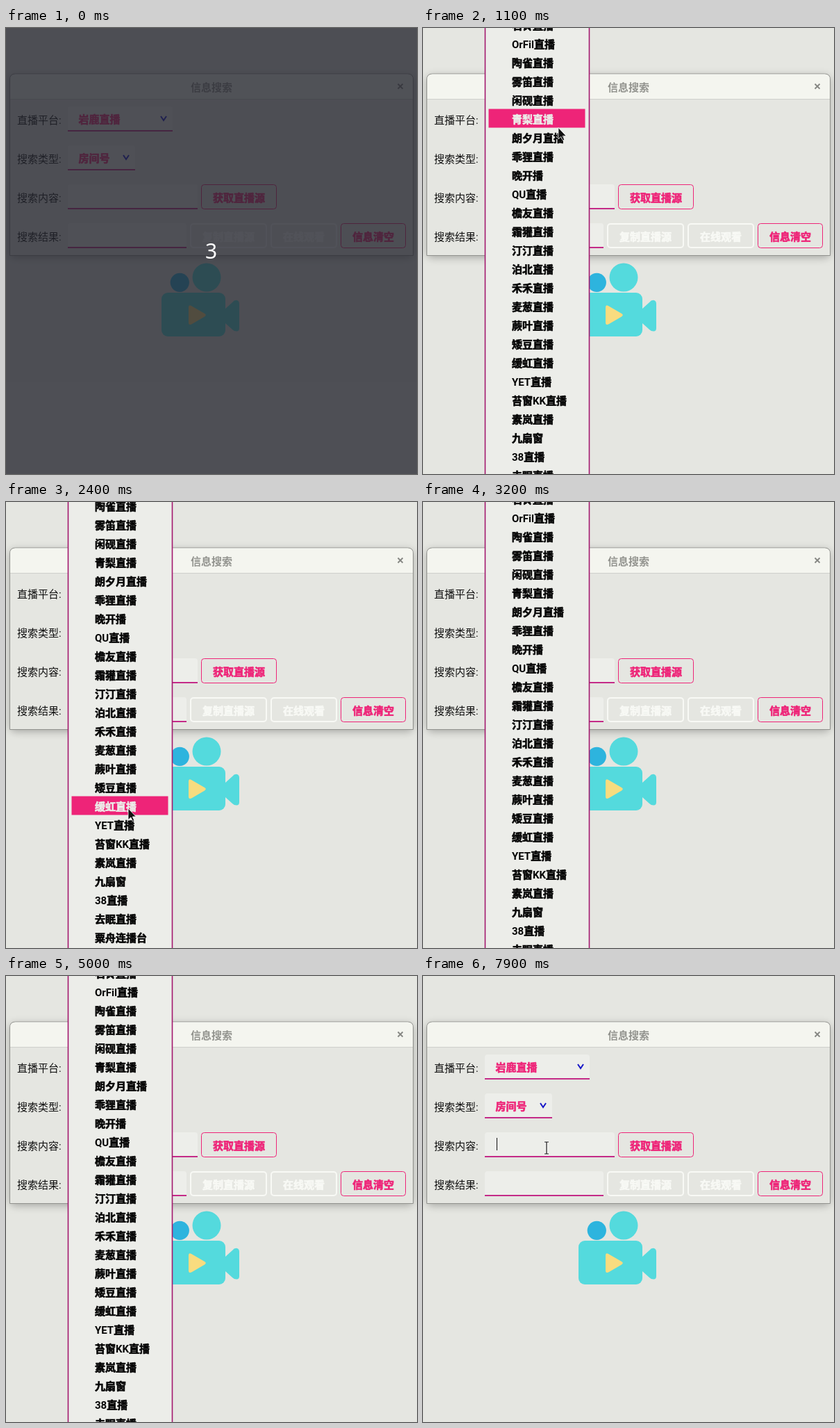
An HTML page for the animation above (8 s loop, 592x642 px).

```html
<!DOCTYPE html>
<html lang="zh-CN">
<head>
<meta charset="utf-8">
<title>信息搜索</title>
<style>
html, body { margin: 0; width: 100%; height: 100%; overflow: hidden; background: #e5e6e1; }
svg { display: block; width: 592px; height: 642px; }
text { font: 15px Roboto, "Noto Sans CJK SC", "Noto Sans CJK", sans-serif; fill: #111; }
.bold { font-weight: 700; stroke: currentColor; stroke-width: .6px; fill: currentColor; }
.latin { stroke: none; }
.pink { color: #ee2478; }
.faint { color: #f8f9f5; }
.row { color: #050505; }
.row.hover { color: #ecede9; }
.row rect { fill: none; }
.row.hover rect { fill: #ee2478; }
.frame { filter: drop-shadow(0 3px 6px rgba(0, 0, 0, .28)); }
.title { font-weight: 700; fill: #92938e; }
.count { font: 30px "Noto Sans", sans-serif; fill: #fff; }
.mid { text-anchor: middle; }
</style>
</head>
<body>
<svg viewBox="0 0 592 642">
  <rect width="592" height="642" fill="#e5e6e1"/>

  <g fill="#54dadd">
    <circle cx="289" cy="359" r="20.5"/>
    <circle cx="250.300" cy="366.300" r="13.600" fill="#2db4de"/>
    <rect x="224" y="381" width="92" height="63" rx="9"/>
    <path d="M316 404 326 395Q329 391 333 392 336 393 336 397V432Q336 436 333 436.500 329 437 326 434L316 425Z"/>
    <path d="M263 402Q263 398 267 400L286 411Q289.500 413 286 415.500L268 426Q263 428.500 263 424Z" fill="#f8dc7f"/>
  </g>

  <rect class="frame" x="5.500" y="66" width="581" height="261.500" rx="8" fill="#e5e6e1"/>
  <path d="M5.500 327.500V74Q5.500 66 13.500 66H578.500Q586.500 66 586.500 74V327.500Z" fill="#e5e6e1" stroke="#90918d"/>
  <path d="M6 102V74.500Q6 66.500 14 66.500H578Q586 66.500 586 74.500V102Z" fill="#f4f5ef"/>
  <path d="M6 102.500H586" stroke="#cfd0cb"/>
  <text class="title mid" x="296" y="91">信息搜索</text>
  <path d="m564.500 80.500 7 7m0-7-7 7" stroke="#858682" stroke-width="1.800"/>

  <g id="form"></g>
  <path id="caret" d="M106.500 233V251" stroke="#111"/>

  <g id="popup">
    <rect x="89.500" y="-5" width="150" height="652" fill="#ecede9" stroke="#a3186e" stroke-width="1.600"/>
    <g id="rows"></g>
  </g>

  <path id="arrow" d="M0 0V16.500L3.800 13 6.400 18.600 8.800 17.500 6.300 12H11.300Z" fill="#111" stroke="#fff" stroke-width=".8"/>
  <g id="beam" fill="none">
    <path d="M-3-8.500H3M0-8.500V8.500M-3 8.500H3" stroke="#fff" stroke-width="3"/>
    <path d="M-3-8.500H3M0-8.500V8.500M-3 8.500H3" stroke="#111" stroke-width="1.200"/>
  </g>

  <g id="shade">
    <rect width="592" height="642" fill="rgb(35,37,45)" fill-opacity=".78"/>
    <text class="count mid" x="295.500" y="332">3</text>
  </g>
</svg>
<script>
const $ = id => document.getElementById(id);
const LOOP = 8000, STEP = 100, ROW = 27, LINE = 56;

const field = (y, w) => `
  <path d="M89 ${y + 36}V${y + 4}q0-4 4-4H${85 + w}q4 0 4 4V${y + 36}Z" fill="#edeeea"/>
  <path d="M89 ${y + 35}h${w}" stroke="#c42b88" stroke-width="2"/>`;
const combo = (y, w, text) => field(y, w) + `
  <text class="bold pink" x="104.5" y="${y + 24}">${text}</text>
  <path d="m${72 + w} ${y + 14} 4 6 4-6" fill="none" stroke="#1515c8" stroke-width="2"/>`;
const button = (x, y, w, text, tone, line) => `
  <g class="${tone}">
    <rect x="${x + line / 2}" y="${y + line / 2}" width="${w - line}" height="${36 - line}" rx="4"
      fill="none" stroke="currentColor" stroke-width="${line}"/>
    <text class="bold mid" x="${x + w / 2}" y="${y + 24.5}">${text}</text>
  </g>`;

const lines = [
  ['直播平台:', y => combo(y, 151, '岩鹿直播')],
  ['搜索类型:', y => combo(y, 97, '房间号')],
  ['搜索内容:', y => field(y, 187) + button(281, y, 109, '获取直播源', 'pink', 1)],
  ['搜索结果:', y => field(y, 171) + button(265, y, 111, '复制直播源', 'faint', 2) +
    button(381, y, 96, '在线观看', 'faint', 2) + button(482, y, 94, '信息清空', 'pink', 1)]
];
$('form').innerHTML = lines.map(([label, controls], i) => {
  const y = 113 + i * LINE;
  return `<text x="16" y="${y + 25}">${label}</text>` + controls(y);
}).join('');

const live = name => name + '直播';
const items = [
  ...'石铃 OrFil 陶雀 雾笛 闲砚 青梨 朗夕月 乖狸'.split(' ').map(live), '晚开播',
  ...'QU 檐友 霜獾 汀汀 泊北 禾禾 麦葱 蕨叶 矮豆 缓虹 YET 苔窗KK 素岚'.split(' ').map(live),
  '九扇窗', live('38'), live('去眠'), '粟舟连播台'
];
$('rows').innerHTML = items.map((name, i) => `
  <g class="row" transform="translate(0 ${i * ROW - 18})">
    <rect x="94.5" y="-.5" width="139" height="27"/>
    <text class="bold" x="128" y="19.5">${name.replace(/\w+/g, '<tspan class="latin">$&</tspan>')}</text>
  </g>`).join('');
const rows = [...$('rows').children];

const ramp = (t, from, to) => Math.min(1, Math.max(0, (t - from) / (to - from)));
const easeOut = k => 1 - (1 - k) ** 2;

// The pointer glides from one resting place to the next.
const ABOVE = -40, BELOW = 690;
const glides = [
  { from: 800, to: 1200, x: 192, y: 144 },
  { from: 1300, to: 1600, x: 186, y: 38 },
  { from: 1700, to: 2100, x: 180, y: BELOW },
  { from: 2200, to: 2400, x: 176, y: 441 },
  { from: 2500, to: 3000, x: 170, y: ABOVE },
  { from: 3200, to: 3700, x: 178, y: BELOW },
  { from: 3800, to: 4100, x: 349, y: 243 },
  { from: 4300, to: 4500, x: 184, y: 134 },
  { from: 4600, to: 4900, x: 168, y: ABOVE },
  { from: 5700, to: 6500, x: 178, y: 247.5 }
];

function pointerAt(t) {
  let x = 239, y = 134;
  for (const glide of glides) {
    const k = easeOut(ramp(t, glide.from, glide.to));
    x += (glide.x - x) * k;
    y += (glide.y - y) * k;
  }
  return [x, y];
}

// The list scrolls to its end when the pointer leaves below, and back when it leaves above.
const scrollAt = t => 44 * (
  ramp(t, 2000, 2200) - ramp(t, 2900, 3100) +
  ramp(t, 3600, 3800) - ramp(t, 4800, 5000));

const show = (id, on) => $(id).setAttribute('visibility', on ? 'visible' : 'hidden');

function draw(t) {
  const [x, y] = pointerAt(t);
  const scroll = scrollAt(t);
  const open = t >= 800 && t < 5800;
  const hovered = Math.floor((y + scroll + 18) / ROW);
  const overField = t >= 5800 && y > 225;

  $('shade').setAttribute('opacity', t < 300 ? 1 : 1 - ramp(t, 200, 600));
  show('popup', open);
  $('rows').setAttribute('transform', `translate(0 ${-scroll})`);
  rows.forEach((row, i) => row.classList.toggle('hover', i === hovered));

  show('arrow', t >= 400 && !overField);
  show('beam', overField);
  for (const id of ['arrow', 'beam']) $(id).setAttribute('transform', `translate(${x} ${y})`);
  show('caret', t >= 6500 && (t < 7400 || t >= 7900));
}

const start = performance.now();
function tick() {
  const t = (performance.now() - start) % LOOP;
  draw(Math.floor(t / STEP) * STEP);
  requestAnimationFrame(tick);
}
tick();
</script>
</body>
</html>
```
